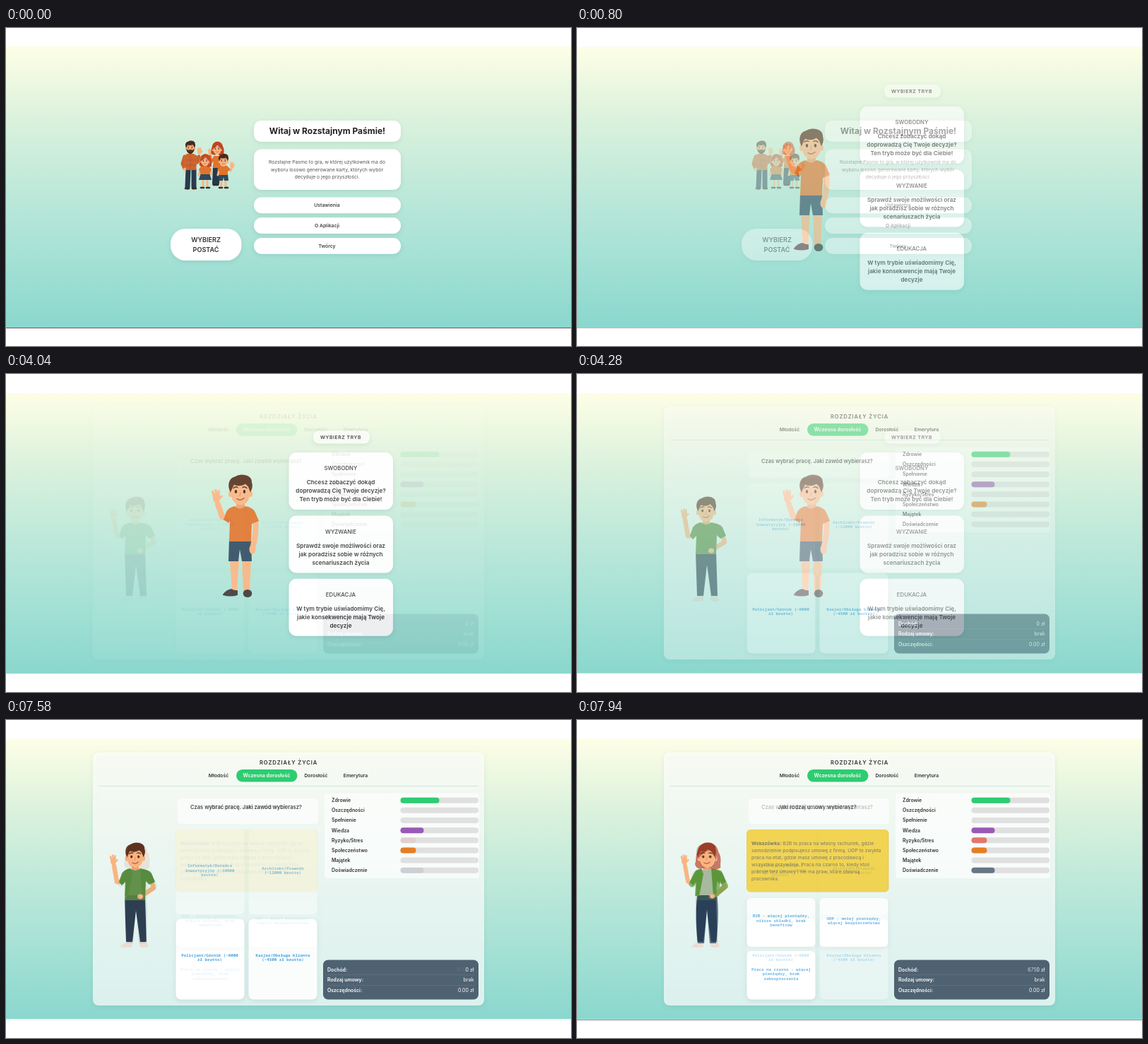
An HTML page for the animation above (8000 ms loop, 800 px wide and 450 px high).

```html
<!DOCTYPE html>
<html lang="pl">
<head>
<meta charset="utf-8">
<title>Rozstajne Pasmo</title>
<style>
html, body { margin: 0; width: 100%; height: 100%; overflow: hidden; background: #fff; }
svg { display: block; width: 100vw; height: 100vh; font-family: Inter, "Open Sans", sans-serif; }
.mono { font-family: "Noto Sans Mono", "DejaVu Sans Mono", monospace; }
.card { filter: drop-shadow(0 2px 3px rgba(0, 60, 50, .1)); }
</style>
</head>
<body>
<svg id="stage" viewBox="0 0 800 450" text-anchor="middle" font-weight="600" fill="#333"></svg>
<script>
const SKIN = '#fab481', ORANGE = '#e0742c', NAVY = '#2e4a5f', GREEN = '#2ecc71', BLUE = '#3498db';

// Drawing helpers, each returning SVG markup
const rect = (x, y, w, h, r, fill, attrs = '') =>
  `<rect x="${x}" y="${y}" width="${w}" height="${h}" rx="${r}" fill="${fill}" ${attrs}/>`;
const card = (x, y, w, h, r, fill = '#fff') => rect(x, y, w, h, r, fill, 'class="card"');
const shape = (d, fill) => `<path d="${d}" fill="${fill}"/>`;
const limb = (d, w, color = SKIN) =>
  `<path d="${d}" fill="none" stroke="${color}" stroke-width="${w}" stroke-linecap="round" stroke-linejoin="round"/>`;
const oval = (x, y, rx, ry, fill = SKIN) => `<ellipse cx="${x}" cy="${y}" rx="${rx}" ry="${ry}" fill="${fill}"/>`;
const text = (x, y, size, str, attrs = '') => `<text x="${x}" y="${y}" font-size="${size}" ${attrs}>${str}</text>`;
const lines = (x, y, gap, size, list, attrs) =>
  list.map((str, i) => text(x, y + i * gap, size, str, attrs)).join('');
const place = (x, y, s, inner) => `<g transform="translate(${x} ${y}) scale(${s})">${inner}</g>`;

const backdrop = (top, bottom, edge) =>
  rect(0, 0, 800, 450, 0, '#fff') + rect(0, top, 800, bottom - top, 0, 'url(#sky)') +
  (edge ? rect(0, 424, 800, 1, 0, '#56625f') : '');

const hand = (x, y, s = 1) => place(x, y, s,
  oval(0, 2, 5, 7) + limb('M-3 1L-5 -6M0 -1L-1 -8M3 1L3 -7', 3.2) + limb('M3 4L7 0', 3));

function head(x, y, s, hair, { long, beard } = {}) {
  const back = long ? shape('M-17 -8C-14 -30 16 -30 19 -8C26 2 21 13 23 18C14 26 4 20 0 17C-8 22 -20 22 -21 12C-18 6 -21 0 -17 -8Z', hair) : '';
  const face = shape('M-13 -12H13V4C13 13 6 19 0 19S-13 13 -13 4Z', SKIN) + oval(-14, 3, 3, 4.5) + oval(14, 3, 3, 4.5);
  const whiskers = beard ? shape('M-13 2L-9 8Q0 4 9 8L13 2V9Q9 20 0 21Q-9 20 -13 9Z', hair) : '';
  const top = long
    ? shape('M-16 4C-18 -16 -10 -23 1 -23C14 -23 19 -10 15 6C12 -2 8 -8 1 -13C-4 -7 -10 -4 -16 4Z', hair)
    : shape('M-14 1C-20 -10 -15 -20 -8 -21C0 -27 17 -24 16 -13C18 -8 16 -3 14 1L11 -7L7 -11C1 -7 -6 -8 -9 -10L-12 -4Z', hair);
  const features = oval(-6.5, 0, 1.7, 2.4, '#33221c') + oval(5.5, 0, 1.7, 2.4, '#33221c') +
    limb('M-10 -5Q-7 -8 -4 -6M3 -6Q6 -8 9 -5', 1.5, '#4a2b1c') +
    limb('M0 1L-1 6', 1, '#d98552') + limb('M-5 10Q0 14 5 9', 1.3, '#a34e31');
  return place(x, y, s, back + face + whiskers + top + features);
}

const family = () =>
  // father
  limb('M258 200L257 225M266 200L266 225', 7, '#2b3a4c') + limb('M254 227H259M264 227H269', 2.5, '#3b2a24') +
  limb('M253 182L250 192L253 199', 5, '#c9602c') + limb('M268 182L271 190L273 182', 5, '#c9602c') +
  shape('M256 178H266L271 183L269 201H253L251 183Z', '#cf652f') +
  limb('M261 180V200M254 187H269M254 194H269', .5, '#9f4824') + hand(274, 174, .55) + oval(253, 200, 2, 2.5) +
  head(261, 169.5, .42, '#4b2a1b', { beard: true }) +
  // mother
  limb('M296 196L295 220M301 196L299 220', 6, '#28384b') + limb('M294 222H300', 2.5, '#3b2a24') +
  limb('M295 184L290 190L289 181', 4, ORANGE) + hand(289, 175, .5) +
  limb('M304 184L308 194', 4.5, ORANGE) + shape('M294 181H304L307 186L303 198H293Z', ORANGE) +
  head(299, 171, .42, '#bf4522', { long: true }) +
  // daughter
  limb('M279 214L279 224M285 214L285 224', 3) + limb('M276 226H280M284 226H288', 2.6, '#34302f') +
  shape('M276 205H288L291 215H273Z', NAVY) + limb('M276 199L273 208M288 199L291 207', 3) +
  shape('M277 195H287L291 200L288 207H276L273 200Z', ORANGE) +
  head(282, 188, .4, '#c54a22', { long: true }) +
  // son
  limb('M305 214L305 224M311 214L311 224', 3) + limb('M302 226H306M310 226H314', 2.6, '#34302f') +
  shape('M302 206H314L315 216H309L308 211L307 216H301Z', NAVY) +
  limb('M302 199L300 208M314 200L318 202L320 197', 3) + hand(320, 194, .5) +
  shape('M303 195H313L318 200L314 203V208H302V203L299 200Z', ORANGE) +
  head(308, 188, .42, '#4b2a1b');

const boy = () =>
  shape('M317 262H330L327 308H320Z', SKIN) + shape('M334 262H347L345 308H336Z', SKIN) +
  shape('M307 312Q312 305 319 304Q325 307 328 306V313Q318 316 307 313Z', '#3b3534') + oval(342, 310.5, 6.3, 5.5, '#3b3534') +
  shape('M316 234H347L348 265H334L331 248L329 265H315Z', NAVY) +
  limb('M313 204L306 202L300 184', 8) + hand(298, 173, 1.05) +
  limb('M353 206Q355 224 350 243', 8) + oval(349, 248, 4.5, 7) +
  rect(326, 178, 12, 14, 3, '#eda06b') +
  shape('M324 187Q331 194 339 187Q350 189 353 196L358 208L348 212L347 237H316L317 208L315 211L308 206L312 195Q315 189 324 187Z', ORANGE) +
  head(332, 166.5, 1, '#57301d');

const paleShoes = shape('M162 320Q168 314 179 313V321Q170 323 162 321Z', '#e9ddd3') +
  shape('M189 313H198Q202 318 201 321Q194 324 189 320Z', '#e9ddd3');

const man = () =>
  paleShoes + shape('M168 252H197L199 314H190L184 270L179 314H170Z', '#2f3e50') +
  limb('M164 229L157 229L153 206', 6.5) + hand(152, 198, .8) +
  limb('M206 227L209 238L191 249', 6.5) +
  rect(178, 203, 10, 11, 3, '#eda06b') +
  shape('M176 210Q183 216 190 210Q203 212 206 217L211 229L203 233L198 228L197 255H168L169 229L164 234L160 229L164 217Q168 211 176 210Z', '#578a3e') +
  oval(190, 250, 4, 3.5) + head(183, 193.5, .83, '#54301f');

const woman = () =>
  paleShoes + shape('M171 245H198Q202 275 197 316H188L184 268L180 316H171Q166 275 171 245Z', '#28415c') +
  limb('M162 232L157 228L153 206', 5.5) + hand(152, 198, .8) +
  rect(179, 203, 10, 12, 3, '#eda06b') + shape('M175 212H193L196 248H172Z', '#c9cdc8') +
  limb('M171 217L163 232', 9, '#5f9c3b') + limb('M202 217L210 235L197 246', 8, '#5f9c3b') +
  shape('M176 210L179 218L173 249H167L169 213Z', '#5f9c3b') + shape('M190 210L204 213L201 249H193Z', '#5f9c3b') +
  oval(192, 249, 4, 3.5) + head(184.5, 193.5, .83, '#b9452d', { long: true });

const welcome = () => backdrop(26, 425, true) + family() +
  card(233, 284, 100.5, 45, 21) + lines(283, 303, 14.3, 9.1, ['WYBIERZ', 'POSTAĆ']) +
  card(351, 131, 208, 30, 10) + text(455, 150, 12, 'Witaj w Rozstajnym Paśmie!', 'font-weight="700" fill="#222"') +
  card(351, 171.5, 208, 57.5, 11) +
  lines(454.5, 192, 10.6, 6.8, ['Rozstajne Pasmo to gra, w której użytkownik ma do',
    'wyboru losowo generowane karty, których wybór', 'decyduje o jego przyszłości.'], 'font-weight="400" fill="#555"') +
  ['Ustawienia', 'O Aplikacji', 'Twórcy'].map((name, i) =>
    card(351, 239.5 + i * 28.8, 208, 22.7, 11) + text(454.5, 253.3 + i * 28.8, 6.8, name, 'fill="#444"')).join('');

const modes = [
  ['SWOBODNY', 'Chcesz zobaczyć dokąd', 'doprowadzą Cię Twoje decyzje?', 'Ten tryb może być dla Ciebie!'],
  ['WYZWANIE', 'Sprawdź swoje możliwości oraz', 'jak poradzisz sobie w różnych', 'scenariuszach życia'],
  ['EDUKACJA', 'W tym trybie uświadomimy Cię,', 'jakie konsekwencje mają Twoje', 'decyzje']
];
const modeMenu = () => backdrop(27, 424) + boy() +
  card(435, 80, 80, 18.5, 8, '#fafdf5') + text(474, 91.7, 6.8, 'WYBIERZ TRYB', 'letter-spacing=".6"') +
  modes.map(([name, ...info], i) => {
    const y = i * 89.4;
    return card(400.5, 111 + y, 147.5, 81, 11) + text(474, 136.2 + y, 7.8, name, 'font-weight="500"') +
      lines(474, 156.4 + y, 12, 8.2, info);
  }).join('');

const stats = ['Zdrowie', 'Oszczędności', 'Spełnienie', 'Wiedza', 'Ryzyko/Stres', 'Społeczeństwo', 'Majątek', 'Doświadczenie'];
const start = 'text-anchor="start"';
const answer = (x, y, list, alpha = 1) =>
  lines(x, y, 6.5, 5.85, list, `class="mono" font-weight="700" fill="${BLUE}" fill-opacity="${alpha}"`);

function board(person, question, levels, income) {
  const bars = stats.map((name, i) => {
    const y = 113.7 + i * 14.15, [width, color] = levels[name] || [];
    return text(461, y + 2.4, 6.9, name, start) + rect(558.5, y - 4, 110.5, 8, 4, '#e0e0e0') +
      (width ? rect(558.5, y - 4, width, 8, 4, color) : '');
  }).join('');
  const money = [['Dochód:', income], ['Rodzaj umowy:', 'brak'], ['Oszczędności:', '0.00 zł']].map(([name, value], i) => {
    const y = 355.6 + i * 14.6;
    return text(455, y, 6.9, name, start + ' fill="#fff"') +
      text(662.5, y, 7, value, 'text-anchor="end" font-weight="400" fill="#fff"') +
      (i < 2 ? rect(455, y + 4.8, 208, .6, 0, '#fff', 'opacity=".14"') : '');
  }).join('');
  return card(123, 46, 554, 358, 8, 'rgba(255,255,255,.7)') +
    text(400, 62.6, 7.6, 'ROZDZIAŁY ŻYCIA', 'letter-spacing=".9"') +
    rect(326, 70, 86.5, 17.5, 8.75, GREEN) + text(369, 81.2, 7.1, 'Wczesna dorosłość', 'fill="#fff"') +
    text(301, 81, 6.8, 'Młodość') + text(439, 81, 6.8, 'Dorosłość') + text(495, 81, 6.8, 'Emerytura') +
    rect(132, 93, 537, 1, 0, '#cfe4da') + person +
    rect(243, 111, 199, 36, 5, 'rgba(255,255,255,.65)') + text(340, 126, 7.5, question) +
    rect(451, 104, 219, 120, 4, 'rgba(255,255,255,.65)') + bars +
    rect(449, 339.5, 220, 56, 7, '#4f6271') + money;
}

const levels = { Zdrowie: [55, GREEN], Wiedza: [33, '#9b59b6'], Społeczeństwo: [22, '#e67e22'] };
const jobs = () => backdrop(27, 423) +
  board(man(), 'Czas wybrać pracę. Jaki zawód wybierasz?', levels, '0 zł') +
  [240.5, 343.5].map(x => rect(x, 154.5, 97, 120.5, 7, 'rgba(255,255,255,.4)') + card(x, 281.5, 97, 114, 7)).join('') +
  answer(288.5, 208.3, ['Informatyk/Doradca', 'inwestycyjny (~10000', 'brutto)'], .6) +
  answer(392, 211.6, ['Architekt/Prawnik', '(~12000 brutto)'], .6) +
  answer(288.5, 334.5, ['Policjant/Górnik (~6000', 'zł brutto)']) +
  answer(392, 334.5, ['Kasjer/Obsługa klienta', '(~4500 zł brutto)']);

const contract = () => backdrop(26, 425, true) +
  board(woman(), 'Jaki rodzaj umowy wybierasz?',
    { ...levels, 'Ryzyko/Stres': [22, '#e74c3c'], Doświadczenie: [33, '#34495e'] }, '6750 zł') +
  rect(240.5, 155.5, 200.5, 87.5, 5, '#f1c40f', 'stroke="#e3b50c" stroke-width=".8"') +
  lines(247, 177, 10, 6.8, ['<tspan font-weight="700">Wskazówka:</tspan> B2B to praca na własny rachunek, gdzie',
    'samodzielnie podpisujesz umowę z firmą. UOP to zwykła', 'praca na etat, gdzie masz umowę z pracodawcą i',
    'wszystkie przywileje. Praca na czarno to, kiedy ktoś', 'pracuje bez umowy i nie ma praw, które chronią',
    'pracownika.'], start + ' font-weight="400" fill="#4a4533"') +
  card(240.5, 252, 97, 69, 6) + card(343.5, 252, 97, 69, 6) + card(240.5, 327, 97, 68.5, 6) +
  answer(289, 279.3, ['B2B - więcej pieniędzy,', 'niższe składki, brak', 'benefitów']) +
  answer(392, 282.5, ['UOP - mniej pieniędzy,', 'więcej bezpieczeństwa']) +
  answer(289, 354.5, ['Praca na czarno - więcej', 'pieniędzy, brak', 'zabezpieczenia']);

const stage = document.getElementById('stage');
const sky = ['#fefee6', '#dcf2dd', '#bfe9da', '#a5e1d5', '#8ad7ce'];
stage.innerHTML = '<linearGradient id="sky" x2="0" y2="1">' +
  sky.map((c, i) => `<stop offset="${i / 4}" stop-color="${c}"/>`).join('') + '</linearGradient>' +
  [welcome, modeMenu, jobs, contract].map(scene => `<g class="scene">${scene()}</g>`).join('');
const scenes = [...stage.querySelectorAll('.scene')];

// Each scene fades in over the previous one in ten steps of 60 ms
const LOOP = 8000, STEP = 60, fadeAt = [-LOOP, 500, 4040, 7580];
function draw(now) {
  const t = now % LOOP;
  scenes.forEach((scene, i) => {
    const alpha = Math.max(0, Math.min(1, (Math.floor((t - fadeAt[i]) / STEP) + 1) / 10));
    scene.style.opacity = alpha;
    scene.style.display = alpha ? '' : 'none';
  });
  requestAnimationFrame(draw);
}
draw(performance.now());
</script>
</body>
</html>
```
